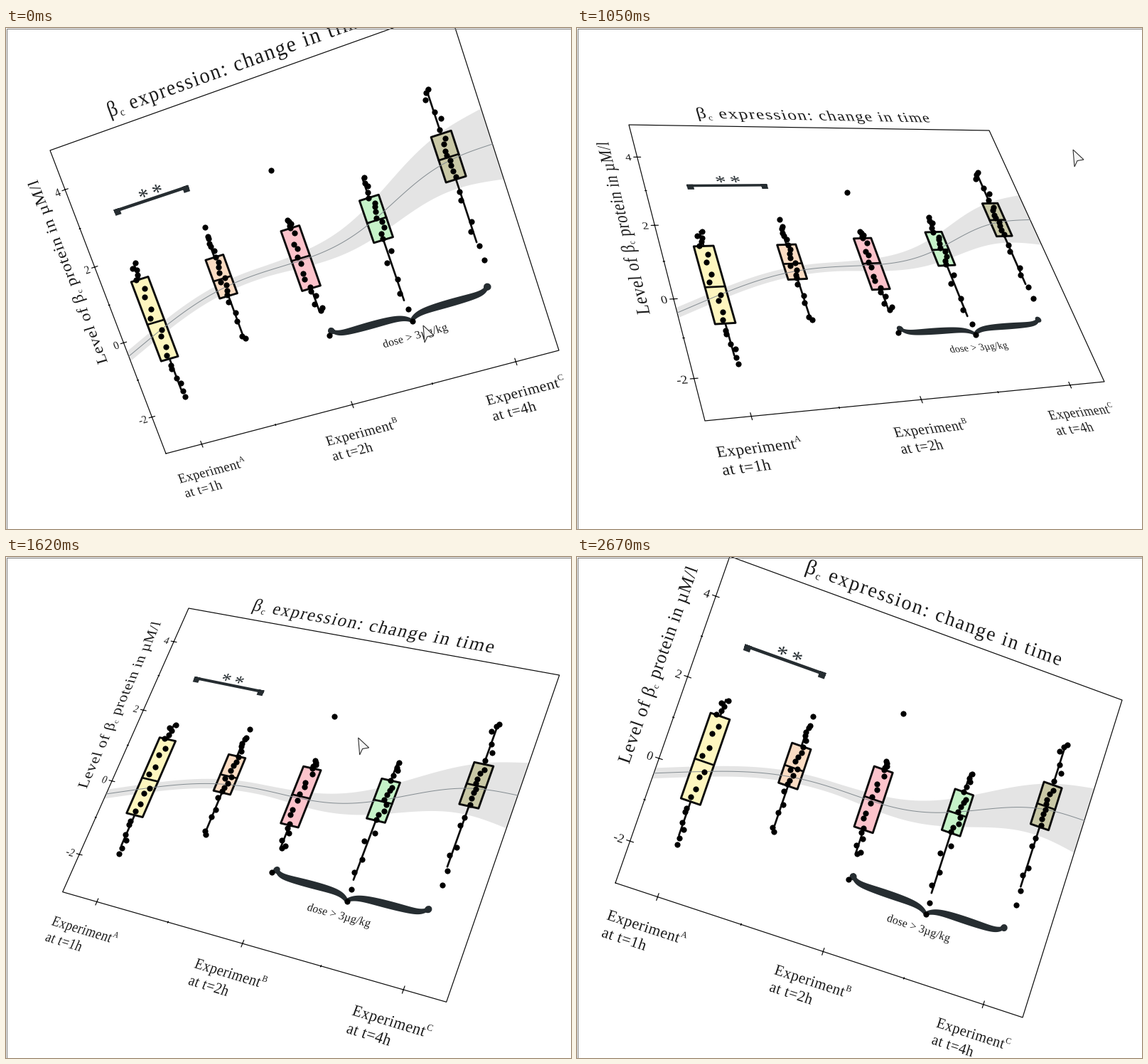
A matplotlib script for the animation above (3.19 s loop, 795 by 704 pixels).

```python
import numpy as np
import matplotlib.pyplot as plt
from matplotlib.animation import FuncAnimation
from matplotlib.patches import PathPatch, Polygon, Rectangle
from matplotlib.path import Path
from matplotlib.textpath import TextPath
from matplotlib.transforms import Affine2D

SW, SH, DPI = 795, 704, 100
PX = 72 / DPI              # one pixel in points
LOOP, STEP = 3190, 22
BEAT, LAST = 131.5, 20     # the picture refreshes once per beat, then rests
W, H = 600, 477            # plot plane, y pointing up
INK, DARK = "#0a0a0a", "#262d31"
SERIF = {"family": "Liberation Serif"}
rng = np.random.default_rng(4)

# beat, then the plot corners: bottom left, bottom right, top right, top left
POSES = np.array([
    (0, 225, 598, 778, 453, 623, -28, 62, 172),
    (3, 222, 573, 770, 450, 640, -9, 47, 170),
    (6, 197, 628, 730, 462, 586, 44, 55, 142),
    (8, 180, 552, 742, 497, 580, 144, 73, 136),
    (11, 92, 479, 614, 611, 779, 149, 276, 105),
    (14, 55, 454, 631, 654, 778, 200, 219, 6),
    (15, 54, 458, 627, 647, 767, 201, 215, -1),
], float)

# beat, then the tip of the pointer
POINTER = np.array([
    (0, 587, 418), (3, 589, 428), (6, 710, 273), (8, 698, 171),
    (11, 457, 220), (14, 573, 322), (17, 660, 502), (20, 662, 712),
], float)
ARROW = np.array([(0, 0), (15, 14), (6, 15.5), (2, 24)])


def track(keys, beat):
    return np.array([np.interp(beat, keys[:, 0], col) for col in keys[:, 1:].T])


def homography(corners):
    rows, rhs = [], []
    for (x, y), (sx, sy) in zip([(0, 0), (W, 0), (W, H), (0, H)], corners):
        rows += [[x, y, 1, 0, 0, 0, -sx * x, -sx * y],
                 [0, 0, 0, x, y, 1, -sy * x, -sy * y]]
        rhs += [sx, sy]
    return np.append(np.linalg.solve(rows, rhs), 1).reshape(3, 3)


def project(m, pts):
    q = np.column_stack([pts, np.ones(len(pts))]) @ m.T
    return q[:, :2] / q[:, 2:]


# ---- shapes on the plane ----
def poly(pts):
    pts = [tuple(p) for p in pts]
    return Path(pts + pts[:1], closed=True)


def rect(x0, y0, x1, y1):
    return poly([(x0, y0), (x1, y0), (x1, y1), (x0, y1)])


def seg(x0, y0, x1, y1):
    return Path([(x0, y0), (x1, y1)], [Path.MOVETO, Path.LINETO])


def ribbon(x, y, half):
    """Band of the given half height around a curve, wound counter-clockwise."""
    return poly(np.column_stack([np.append(x, x[::-1]),
                                 np.append(y - half, (y + half)[::-1])]))


def glyph_path(s, size, x=0, y=0):
    return TextPath((x, y), s, size=size, prop=SERIF)


def advance(s, size):
    return (glyph_path(s + "|", size).get_extents().x1
            - glyph_path("|", size).get_extents().x1)


def label(runs, x, y, spacing=0.0, align=0.0, angle=0):
    """Lay out (text, size, raise) runs as one outline."""
    glyphs, pen = [], 0.0
    for s, size, dy in runs:
        for i, ch in enumerate(s):
            if ch != " ":
                glyphs.append(glyph_path(ch, size, pen + advance(s[:i], size) + spacing * i, dy))
        pen += advance(s, size) + spacing * len(s)
    place = Affine2D().translate(-align * pen, 0).rotate_deg(angle).translate(x, y)
    return Path.make_compound_path(*glyphs).transformed(place)


def brace(x0, x1, y):
    s = np.linspace(-1, 1, 121)
    d = 1 - abs(s)         # 0 at the ends, 1 at the tip
    rise = 9 * np.exp(-d / 0.06) - 9 * np.exp(-(1 - d) / 0.09)
    x = (x0 + x1) / 2 + (x1 - x0) / 2 * s
    ends = [Path.circle((e, y + 7.5), 5) for e in (x0 + 1, x1 - 1)]
    return [ribbon(x, y + rise, 3.4 + 1.9 * np.sin(np.pi * d))] + ends


# trend: a rising line with a fading, quickening wave; the band opens to the right
u = np.linspace(0, 1, 90)
wave = (0.042 - 0.023 * u) * np.sin(2 * np.pi * (0.764 * u + 0.736 * u ** 2))
trend = 0.33 + 0.284 * u + wave
spread = 0.016 + 0.086 * (np.clip(u - 0.4, 0, 1) / 0.6) ** 1.5
band = ribbon(u * W, trend * H, spread * H)
curve = Path(np.column_stack([u * W, trend * H]))

boxes, strokes, dots = [], [], []


def box(pos, color, five, outliers):
    """Box plot from low, q1, median, q3, high with samples that follow them."""
    x, hw = pos * W, 0.0232 * W
    low, q1, med, q3, high = np.array(five) * H
    boxes.append((rect(x - hw, q1, x + hw, q3), color))
    strokes.extend([seg(x, low, x, q1), seg(x, q3, x, high), seg(x - hw, med, x + hw, med)])
    n = 17
    rank = (np.arange(n) + rng.uniform(0.2, 0.8, n)) / (n - 0.5)
    heights = np.interp(rank, np.linspace(0, 1, 5), [low, q1, med, q3, high])
    shifts = np.clip(rng.normal(0, 3.2, n), -6, 6)
    dots.extend(zip(x + shifts, heights))
    dots.extend((x + 2, v * H) for v in outliers)


box(.1, "#fef6bf", (.185, .287, .408, .548, .599), [.159, .178])
box(.3, "#fbdcc3", (.280, .421, .476, .544, .602), [.637, .609, .282])
box(.5, "#fcc3cb", (.302, .372, .466, .559, .584), [.735, .300, .222])
box(.7, "#c6f3c9", (.261, .447, .507, .575, .634), [.232, .196])
box(.9, "#c9c8a6", (.364, .551, .616, .684, .813), [.813, .352, .309])

# axes: the values run from -3 to 5
frame = [rect(0, 0, W, H)]
texts = []
for val in range(-2, 5):
    y = (val + 3) / 8 * H
    r = 1.2 if val % 2 else 5
    frame.append(seg(-r, y, r, y))
    if val % 2 == 0:
        texts.append(label([(str(val), 17, 0)], -8.5, y - 6, align=1))
for k in range(5):
    x, r = (0.1 + 0.2 * k) * W, 1.2 if k % 2 else 5
    frame.append(seg(x, -r, x, r))
for k, name in enumerate("ABC"):
    x = (0.007 + 0.4 * k) * W
    texts.append(label([("Experiment", 21, 0), (name, 12, 9)], x, -50, 0.45))
    texts.append(label([(f"at t={2 ** k}h", 21, 0)], x + 1, -74, 0.45))

texts += [
    label([("β", 30, 0), ("c", 15, -4), (" expression: change in time", 29, 0)],
          W / 2 + 1.5, H + 15.5, 1.87, 0.5),
    label([("Level of β", 25, 0), ("c", 12, -3), (" protein in µM/l", 25, 0)],
          -35.5, 0.632 * H, 0.75, 0.5, 90),
    label([("dose > 3µg/kg", 16, 0)], 371, 67.5, 0.2),
]
marks = brace(306, 536, 103.5) + [
    rect(60, 363.5, 180, 368), rect(60, 359, 69.5, 368), rect(170.5, 359, 180, 368),
    label([("**", 32, 0)], 126, 362, 6, 0.5)]

# ---- stage ----
fig = plt.figure(figsize=(SW / DPI, SH / DPI), dpi=DPI, facecolor="white")
ax = fig.add_axes([0, 0, 1, 1])
ax.set(xlim=(0, SW), ylim=(SH, 0))
ax.axis("off")

layers = []


def layer(paths, fill="none", line="none", width=0.0):
    path = Path.make_compound_path(*paths)
    patch = PathPatch(path, facecolor=fill, edgecolor=line, linewidth=width * PX,
                      joinstyle="round", capstyle="round", zorder=len(layers) + 1)
    ax.add_patch(patch)
    layers.append((patch, path))


layer([band], fill="#e4e4e4")
layer(frame, line=INK, width=1.2)
for path, color in boxes:
    layer([path], fill=color, line=INK, width=2.9)
layer([curve], line="#858d92", width=1.0)
layer(strokes, line=INK, width=2.7)
layer(marks, fill=DARK)
layer(texts, fill="#1c1c1c")

dots = np.array(dots)
points, = ax.plot([], [], "o", color="black", ms=8.2 * PX, mew=0, zorder=30)
pointer = Polygon(ARROW, closed=True, facecolor="#f6f6f6", edgecolor="#303030",
                  linewidth=0.8, zorder=40)
ax.add_patch(pointer)
ax.add_patch(Rectangle((0.5, 0.5), SW - 1, SH - 1, fill=False, edgecolor="#777777",
                       linewidth=PX, zorder=50))


def update(i):
    beat = min(int((i + 1) * STEP / BEAT), LAST)
    m = homography(track(POSES, beat).reshape(4, 2))
    for patch, path in layers:
        patch.set_path(Path(project(m, path.vertices), path.codes))
    points.set_data(*project(m, dots).T)
    pointer.set_xy(ARROW + track(POINTER, beat))
    return [patch for patch, _ in layers] + [points, pointer]


anim = FuncAnimation(fig, update, frames=LOOP // STEP, interval=STEP,
                     repeat=True, repeat_delay=0, blit=False)
plt.show()
```
